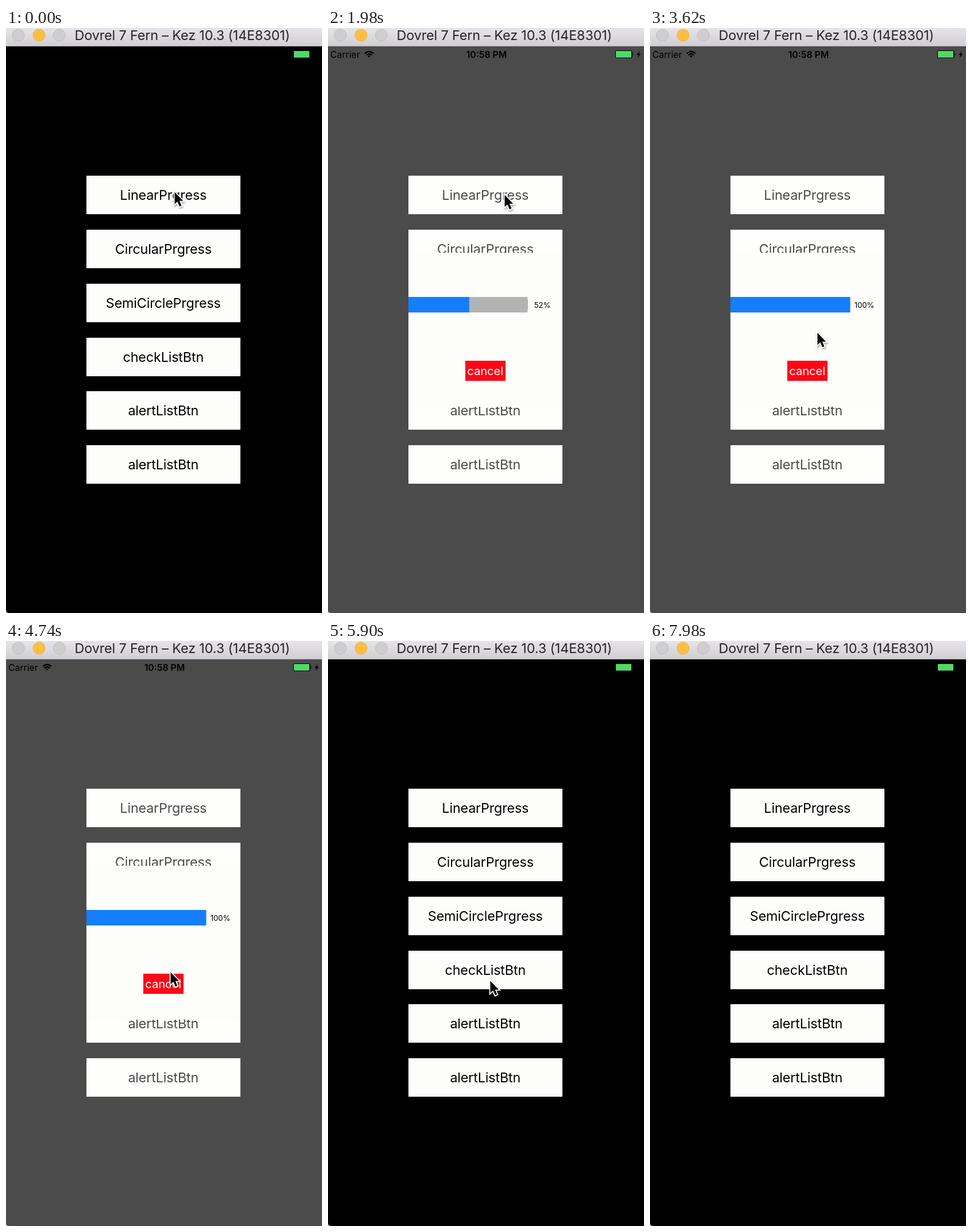
An HTML page that plays this animation: 550 px wide and 1018 px high, repeating every 8 s.

```html
<!DOCTYPE html>
<html lang="en">
<head>
<meta charset="utf-8">
<title>Progress dialog demo</title>
<style>
  html, body { margin: 0; width: 100%; height: 100%; overflow: hidden; background: #b9b7bb; }
  svg { display: block; width: 550px; height: 1018px; }
  text { font-family: Inter, "Open Sans", sans-serif; letter-spacing: -.006em; white-space: pre; }
  .mid { text-anchor: middle; }
  .label { font-size: 23.3px; }
  .status text { font-size: 15.8px; letter-spacing: 0; }
  #cursor { filter: drop-shadow(1px 2px 1.5px rgba(0, 0, 0, .35)); }
</style>
</head>
<body>
<svg viewBox="0 0 550 1018">
  <defs>
    <linearGradient id="bar" x2="0" y2="1">
      <stop stop-color="#e6e4e8"/>
      <stop offset="1" stop-color="#d0ced2"/>
    </linearGradient>
  </defs>

  <path d="M0 32H550V1018H6Q0 1018 0 1012Z"/>
  <g id="buttons"></g>

  <g id="dialog" visibility="hidden">
    <path d="M0 32H550V1018H6Q0 1018 0 1012Z" fill="#fff" opacity=".295"/>
    <rect x="140" y="391" width="268" height="268" fill="#fdfdfc"/>
    <path d="M140 468H347Q349.5 482 347 495H140Z" fill="#b3b3b3"/>
    <rect id="fill" x="140" y="468" height="27" fill="#157efb"/>
    <text id="percent" class="mid" x="373" y="487" font-size="13.2">0%</text>
    <rect x="239" y="579" width="70" height="35" fill="#fd0717"/>
    <text class="mid" x="273.7" y="604" font-size="20.3" fill="#fff">cancel</text>
  </g>

  <g class="status">
    <text x="4" y="52">Carrier</text>
    <g fill="none" stroke="#000" stroke-width="2.2">
      <path d="M64 44.5Q71.5 37.5 79 44.5M66.8 47.3Q71.5 43 76.2 47.3"/>
      <path d="M69 48.8Q71.5 46.8 74 48.8L71.5 51.7Z" fill="#000" stroke="none"/>
    </g>
    <text class="mid" x="276" y="52" font-weight="600">10:58 PM</text>
    <rect x="500" y="39" width="29.5" height="13.5" rx="2"/>
    <path d="M530.5 43Q533 45.7 530.5 48.5ZM542.5 40L537 47H540.2L538.8 52L544.5 44.7H541.2Z"/>
    <rect x="501" y="40" width="27" height="11.5" rx="1" fill="#53d769"/>
  </g>

  <rect width="550" height="32" fill="url(#bar)"/>
  <rect y="31" width="550" height="1" fill="#b3b1b5"/>
  <g stroke-width="1">
    <circle cx="21.5" cy="12.5" r="10.5" fill="#cfcecf" stroke="#bdbcbd"/>
    <circle cx="57.5" cy="12.5" r="10.5" fill="#fdbe41" stroke="#eeb040"/>
    <circle cx="93" cy="12.5" r="10.5" fill="#cfcecf" stroke="#bdbcbd"/>
  </g>
  <text x="119.5" y="21" font-size="23.4" fill="#262528">Dovrel 7 Fern – Kez 10.3 (14E8301)</text>

  <path id="cursor" d="M.5 1.5V22.5L5.3 18L9 26.5L12.4 25L8.8 16.8H15.2Z"
        stroke="#fff" stroke-width="3.6" paint-order="stroke"/>
</svg>
<script>
const LOOP = 8000, OPEN = 300, CLOSE = 5860, BAR = 208.5;
const $ = id => document.getElementById(id);

const labels = ["LinearPrgress", "CircularPrgress", "SemiCirclePrgress",
  "checkListBtn", "alertListBtn", "alertListBtn"];
$("buttons").innerHTML = labels.map((label, i) => {
  const y = Math.round(257.2 + i * 93.8);
  return `<rect x="140" y="${y}" width="268" height="67" fill="#fdfdfc"/>
    <text class="mid label" x="273.8" y="${y + 42}">${label}</text>`;
}).join("");

// Pointer stops: time, x, y
const path = [
  [0, 293, 284], [1000, 293, 284], [1800, 307, 289], [2700, 307, 289],
  [3450, 291, 529], [3900, 291, 529], [4500, 286, 575], [4900, 286, 575],
  [5700, 282, 590], [6200, 282, 590], [6800, 554, 520], [LOOP, 554, 520]
];

const clamp = (v, max = 1) => Math.min(max, Math.max(0, v));

function pointerAt(t) {
  const i = path.findIndex(stop => stop[0] > t);
  const [t0, x0, y0] = path[i - 1], [t1, x1, y1] = path[i];
  const k = (t - t0) / (t1 - t0), e = k * k * (3 - 2 * k);
  return [x0 + (x1 - x0) * e, y0 + (y1 - y0) * e];
}

function draw(t) {
  $("dialog").setAttribute("visibility", t >= OPEN && t < CLOSE ? "visible" : "hidden");
  $("percent").textContent = Math.floor(clamp((t - 308) / 32, 100)) + "%";
  $("fill").setAttribute("width", BAR * clamp((t - 381) / 3153));
  $("cursor").setAttribute("transform", `translate(${pointerAt(t)})`);
}

function tick() {
  draw(performance.now() % LOOP);
  requestAnimationFrame(tick);
}
tick();
</script>
</body>
</html>
```
